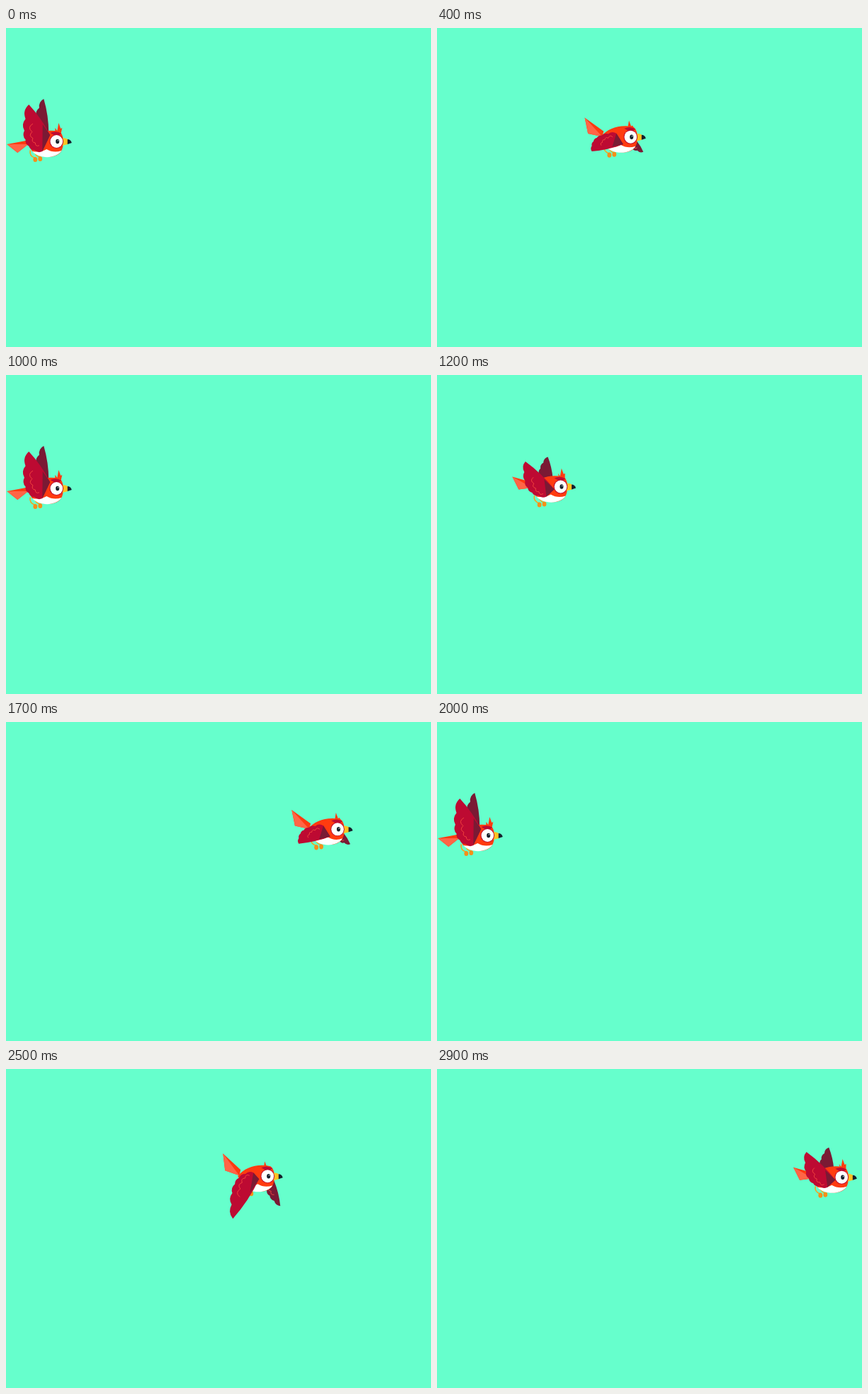
An HTML page with a canvas that plays this animation: 600 px wide and 450 px high, repeating every 3 s.

```html
<!DOCTYPE html>
<html lang="en">
<head>
<meta charset="utf-8">
<title>Flying bird</title>
<style>
  html, body { margin: 0; width: 100%; height: 100%; overflow: hidden; background: #66ffcc; }
  canvas { display: block; }
</style>
</head>
<body>
<canvas id="stage" width="600" height="450"></canvas>
<script>
const ctx = document.getElementById('stage').getContext('2d');

const COLORS = {
  sky: '#66ffcc', red: '#ff3b10', light: '#ff6546', wing: '#bd0a32',
  dark: '#7a1a34', line: '#f4493f', white: '#ffffff', black: '#15202c',
  beak: '#ffc121', leg: '#f5a31d', foot: '#f58f1a'
};

const mix = (a, b, t) => a.map((v, i) => v + (b[i] - v) * t);

// Point on the quadratic curve a, b, c.
const along = (a, b, c, t) => mix(mix(a, b, t), mix(b, c, t), t);

function fill(color) {
  ctx.fillStyle = color;
  ctx.fill();
}

function polygon(points, color) {
  ctx.beginPath();
  points.forEach(p => ctx.lineTo(...p));
  ctx.closePath();
  fill(color);
}

function oval(x, y, rx, ry, color) {
  ctx.beginPath();
  ctx.ellipse(x, y, rx, ry, 0, 0, Math.PI * 2);
  fill(color);
}

function bulgeTo(a, b, amount) {
  const [x, y] = mix(a, b, 0.5);
  ctx.quadraticCurveTo(x + (b[1] - a[1]) * amount, y - (b[0] - a[0]) * amount, ...b);
}

function scallops(points, amount) {
  for (let i = 1; i < points.length; i++) bulgeTo(points[i - 1], points[i], amount);
}

// The straight edge runs tip to front, the feathered one root to tip.
function drawWing({ tip, front, root, bend, feathers }, side, color, veins) {
  const edge = Array.from({ length: feathers + 1 },
    (_, i) => along(root, bend, tip, i / feathers));
  ctx.beginPath();
  ctx.moveTo(...tip);
  bulgeTo(tip, front, side * 0.07);
  ctx.lineTo(...root);
  scallops(edge, side * 0.35);
  fill(color);
  if (!veins) return;

  const inner = edge.slice(1, -1).map(p => mix(p, front, 0.3));
  ctx.beginPath();
  ctx.moveTo(...inner[0]);
  scallops(inner, side * 0.7);
  ctx.strokeStyle = COLORS.line;
  ctx.lineWidth = 0.9;
  ctx.stroke();
}

// Wings swing with flap: 0 is fully raised, 1 fully lowered.
function nearWing(flap, lowered) {
  const root = [-20, lowered ? -5 : 14];
  return {
    tip: along([-39, -52], [-66, -27], [-49, 60], flap),
    front: along([-9, -9], [-8, 23], [-12, 4], flap),
    root, bend: [-58, root[1]], feathers: 6
  };
}

function farWing(flap, lowered) {
  const tip = lowered ? [18, 84 * flap - 42] : [-18, 72 * flap - 60];
  const root = lowered ? [-3, 13] : [-30, -9];
  const [x, y] = mix(root, tip, 0.5);
  return {
    tip, root, front: lowered ? [9, 6] : [-11, -12],
    bend: [x - 9, y], feathers: 4
  };
}

function drawTail(flap) {
  const swing = Math.sqrt(flap);
  const tip = [7 * flap - 70, 4 - 36 * swing];
  const low = [tip[0] + 15 - 12 * swing, tip[1] + 12 + 12 * swing];
  const join = [-40, 4 - 5 * swing];
  polygon([tip, low, join, [-38, -2 - 7 * swing]], COLORS.red);
  polygon([tip, low, join], COLORS.light);
}

function drawFeet() {
  ctx.strokeStyle = COLORS.leg;
  ctx.lineWidth = 1.6;
  for (let i = 0; i < 2; i++) {
    const x = 7 * i - 30, y = 25.5 - i;
    ctx.beginPath();
    ctx.moveTo(x - 7, y - 13);
    ctx.quadraticCurveTo(x - 9, y - 5, x, y - 2);
    ctx.stroke();
    oval(x, y, 2.9, 3.6, COLORS.foot);
  }
}

function drawBody() {
  ctx.beginPath();
  ctx.moveTo(-42, 0);
  ctx.bezierCurveTo(-32, -13, -14, -18, 4, -14);
  ctx.bezierCurveTo(12, -9, 11, 10, 5, 16);
  ctx.bezierCurveTo(-3, 25, -25, 23, -35, 13);
  ctx.closePath();
  fill(COLORS.red);

  ctx.beginPath();
  ctx.moveTo(-34, 14);
  ctx.quadraticCurveTo(-22, 16, -14, 11);
  ctx.quadraticCurveTo(-4, 17, 7, 13);
  ctx.bezierCurveTo(0, 25, -25, 25, -34, 14);
  fill(COLORS.white);
}

function drawCrest(flap) {
  const x = 3 - 7 * flap, y = 5 * flap * flap - 26;
  polygon([[-2, -12], [x - 5, y + 7], [x - 2, y + 11], [x, y],
    [x + 3, y + 8], [x + 5, y + 7], [6, -10]], COLORS.red);
}

function drawHead() {
  ctx.beginPath();
  ctx.moveTo(-9, -12);
  ctx.quadraticCurveTo(0, -16, 7, -11);
  ctx.lineTo(0, -7);
  fill(COLORS.wing);

  ctx.beginPath();
  ctx.moveTo(8, -5);
  ctx.quadraticCurveTo(13, -5, 16, -3);
  ctx.lineTo(16, 4);
  ctx.quadraticCurveTo(12, 5, 8, 6);
  fill(COLORS.beak);

  ctx.beginPath();
  ctx.moveTo(15.5, -3);
  ctx.quadraticCurveTo(20, -3, 21.5, 2);
  ctx.lineTo(15.5, 4);
  fill(COLORS.black);

  oval(0, 0, 9.8, 9.8, COLORS.wing);
  oval(0, 0, 8.8, 9, COLORS.white);
  oval(1.4, 0, 2.5, 3.2, COLORS.black);
  oval(2.2, -1.2, 0.7, 0.8, COLORS.white);
}

function drawBird(flap) {
  const lowered = flap > 0.5;
  const side = lowered ? -1 : 1;
  const near = nearWing(flap, lowered);
  drawWing(farWing(flap, lowered), side, COLORS.dark, lowered);
  drawTail(flap);
  drawFeet();
  drawBody();
  drawWing(near, side, COLORS.wing, true);
  polygon([near.root, near.front, mix(near.front, near.tip, 0.35)], COLORS.dark);
  drawCrest(flap);
  drawHead();
}

function render() {
  // Six steps per crossing, sampled ten times a second.
  const tick = Math.floor(performance.now() / 100) % 10;
  const step = Math.floor(tick * 6 / 10);
  const flap = (1 - Math.cos(step * Math.PI / 3)) / 2;
  ctx.fillStyle = COLORS.sky;
  ctx.fillRect(0, 0, 600, 450);
  ctx.save();
  ctx.translate(
    71.3 + 100 * step + 3.4 * Math.sin(step * Math.PI * 0.4),
    160 - 1.2 * step - 5.2 * flap);
  drawBird(flap);
  ctx.restore();
  requestAnimationFrame(render);
}

render();
</script>
</body>
</html>
```
